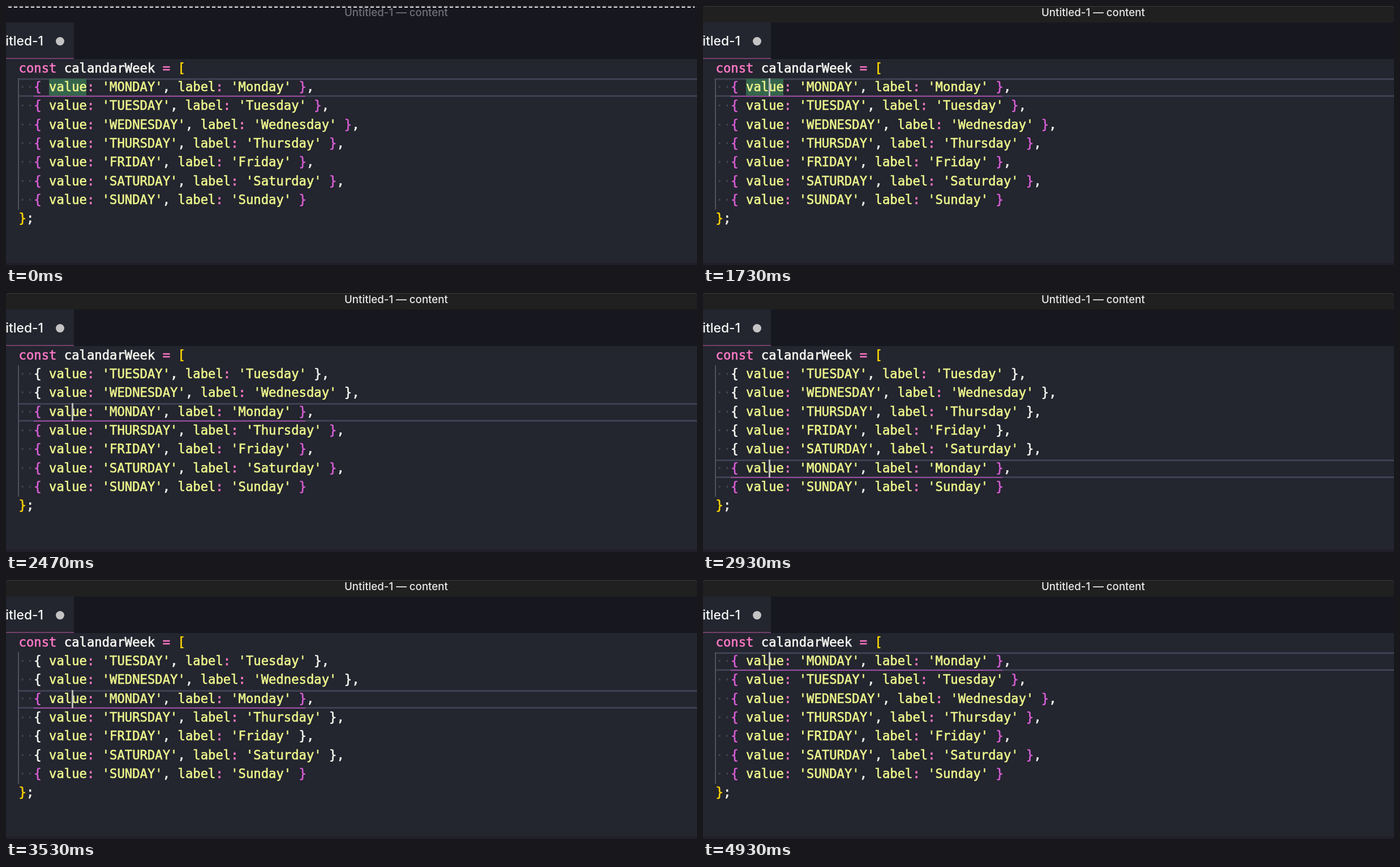
These frames come from a looping animation (1221 by 459 pixels, 4.99 s). An HTML page:

```html
<!DOCTYPE html>
<html lang="en">
<head>
<meta charset="utf-8">
<title>Untitled-1</title>
<style>
  html, body { margin: 0; width: 100%; height: 100%; overflow: hidden; background: #23252f; }
  #stage { position: absolute; left: 0; top: 0; width: 1221px; height: 459px; overflow: hidden; background: #23252f; }
  #stage div { position: absolute; white-space: pre; }
  .bar { left: 0; top: 0; width: 1221px; height: 94px; background: #17181f; }
  .head { left: 0; top: 0; width: 1221px; height: 29px; border-radius: 5px 5px 0 0; background: #17181f; box-shadow: inset 0 1px #2c2d33; }
  .title { left: 598px; top: 0; font: 500 18.7px/24px Inter, sans-serif; color: #707176; }
  .focus .head { background: #202020; box-shadow: inset 0 1px #3c3c3c; }
  .focus .title { color: #e9e9e9; }
  .ants { left: 4px; top: 1px; width: 1213px; height: 2px;
    background: repeating-linear-gradient(90deg, #e4e4e6 0 6px, transparent 6px 10px); }
  .tab { left: 0; top: 29px; width: 120px; height: 63px; background: #23252f; border-bottom: 2px solid #74406b; }
  .name { right: 54px; top: 17px; font: 500 22.8px/32px Inter, sans-serif; color: #f6f6f4; }
  .dot { left: 87.5px; top: 26px; width: 15px; height: 15px; border-radius: 50%; background: #c3c3c3; }
  .row { left: 22.5px; height: 33px; font: 22.22px/33px "DejaVu Sans Mono", monospace; color: #f8f8f2; -webkit-text-stroke: .6px; }
  .k { color: #ff79c6; }
  .y { color: #edf58b; }
  .g { color: #ffd700; }
  .b { color: #da5fd6; }
  .w { color: #42444f; -webkit-text-stroke: 0; }
  .plain .b { color: #f8f8f2; }
  .guide { left: 21px; top: 128px; width: 2px; height: 233px; background: #50525b; }
  .line { left: 22px; width: 1199px; height: 27px; border: solid #3f4052; border-width: 3px 0; }
  .under { left: 49px; width: 480px; height: 2px; background: #96489a; }
  .word { left: 76px; width: 66px; height: 31px; top: 129px; background: #35654c; }
  .caret { left: 116px; width: 3px; height: 32px; background: #b9b9b4; }
  .foot { left: 0; top: 455px; width: 1221px; height: 4px; background: #211e2a; }
</style>
</head>
<body>
<div id="stage">
  <div class="bar"></div>
  <div class="head"></div>
  <div class="title">Untitled-1 — content</div>
  <div class="ants"></div>
  <div class="tab"><div class="name">Untitled-1</div><div class="dot"></div></div>
  <div class="line"></div>
  <div class="word"></div>
  <div class="guide"></div>
  <div class="under"></div>
  <div class="row" style="top:94px"><span class="k">const</span> calandarWeek <span class="k">=</span> <span class="g">[</span></div>
  <div class="row" style="top:360px"><span class="g">}</span>;</div>
  <div class="caret"></div>
  <div class="foot"></div>
</div>
<script>
const LOOP = 4990, FOCUS = 1400, RECOLOR = 4070, BLINK = 500;
const downs = [2330, 2470, 2600, 2730, 2930];
const ups = [3200, 3400, 3530, 3670, 3800];
const days = ['Monday', 'Tuesday', 'Wednesday', 'Thursday', 'Friday', 'Saturday', 'Sunday'];

const stage = document.getElementById('stage');
const find = name => stage.querySelector('.' + name);
const [ants, line, word, under, caret] = ['ants', 'line', 'word', 'under', 'caret'].map(find);
const span = (cls, text) => `<span class="${cls}">${text}</span>`;
const field = (key, text) => span('y', key) + span('k', ':') + ' ' + span('y', `'${text}'`);
const rowTop = i => Math.round(128 + 33.3 * i);

const rows = days.map((day, i) => {
  const row = document.createElement('div');
  row.className = 'row';
  row.innerHTML = span('w', '··') + span('b', '{') + ' ' +
    field('value', day.toUpperCase()) + ', ' + field('label', day) + ' ' +
    span('b', '}') + (i < 6 ? ',' : '');
  stage.insertBefore(row, caret);
  return row;
});

function draw(t) {
  const passed = downs.filter(m => t >= m).length;
  const pos = passed - ups.filter(m => t >= m).length;
  const lastKey = Math.max(FOCUS, ...downs.concat(ups).filter(m => t >= m));
  const focused = t >= FOCUS;

  stage.classList.toggle('focus', focused);
  ants.hidden = t >= 70;
  word.hidden = passed > 0;
  caret.hidden = !focused || Math.floor((t - lastKey) / BLINK) % 2 === 1;

  // the first row travels; each row it has crossed shifts up one slot
  rows.forEach((row, i) => {
    const slot = i === 0 ? pos : i <= pos ? i - 1 : i;
    row.style.top = rowTop(slot) - 1 + 'px';
    row.classList.toggle('plain', i > 0 && i <= passed && t < RECOLOR);
  });
  const top = rowTop(pos);
  line.style.top = top + 'px';
  under.style.top = top + 31 + 'px';
  caret.style.top = top + 'px';
}

const start = performance.now();
function tick(now) {
  draw(Math.max(0, now - start) % LOOP);
  requestAnimationFrame(tick);
}
draw(0);
requestAnimationFrame(tick);
</script>
</body>
</html>
```
